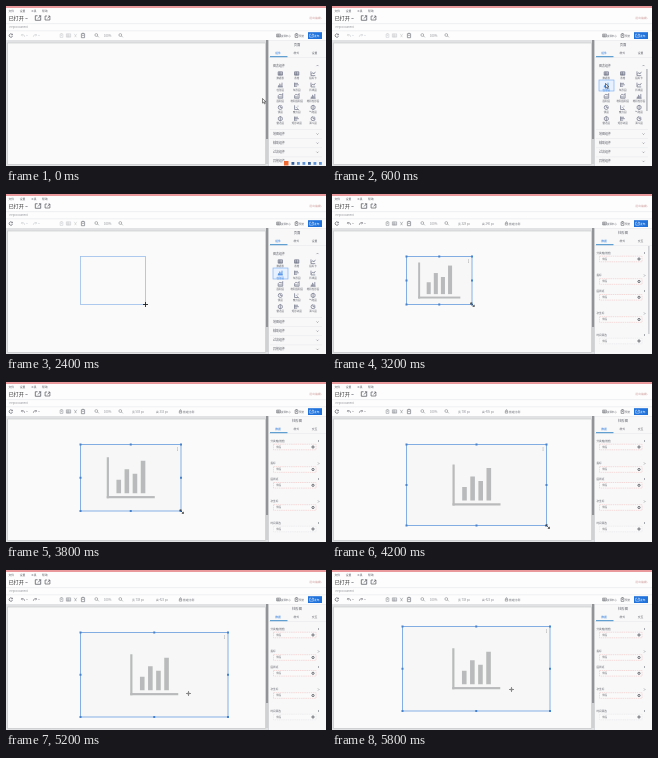
These frames come from a looping animation (320x160 px, 6.2 s). An HTML page with a canvas:

```html
<!DOCTYPE html>
<html lang="zh">
<head>
<meta charset="utf-8">
<style>
html, body { margin: 0; width: 100%; height: 100%; overflow: hidden; background: #fff; }
canvas { display: block; width: 320px; height: 160px; }
</style>
</head>
<body>
<canvas id="stage" width="320" height="160"></canvas>
<script>
const c = document.getElementById('stage').getContext('2d');
const LOOP = 6200, STEP = 200, LAST = 5800;
const BLUE = '#1f72dc', INK = '#5c5e66', GREY = '#85888e', RULE = '#e4e5e8', SHAPE = '#b9babb';
const LEFT = 74.5, TOP = 62.5;

// Each key: time, x, y
const pointer = [[0, 257, 94], [200, 264, 88], [400, 274, 79], [600, 274, 79], [800, 226, 70],
  [1000, 136, 58], [1200, 78, 53], [1400, 74, 62], [1600, 79, 66], [2000, 112, 90], [2400, 139, 110],
  [3400, 140, 110], [3600, 150, 116], [3800, 175, 129], [4000, 200, 138], [4200, 215, 144],
  [4600, 222, 147], [4800, 202, 135], [5000, 182, 123], [5200, 182, 123], [5800, 179, 119]];
const corner = [[2600, 140, 110.5], [3400, 140, 110.5], [3600, 150, 116], [3800, 175, 129],
  [4000, 200, 138], [4200, 214.5, 143.5], [4600, 222, 147]];
const shift = [[5200, 0, 0], [5800, -4, -6]];

function at(keys, t) {
  let i = keys.findIndex(k => k[0] > t);
  if (i < 0) return keys[keys.length - 1].slice(1);
  if (i === 0) return keys[0].slice(1);
  const a = keys[i - 1], b = keys[i], p = (t - a[0]) / (b[0] - a[0]);
  return [a[1] + (b[1] - a[1]) * p, a[2] + (b[2] - a[2]) * p];
}

function box(x, y, w, h, color) {
  c.fillStyle = color;
  c.fillRect(x, y, w, h);
}

function frame(x, y, w, h, color, width = 1) {
  c.strokeStyle = color;
  c.lineWidth = width;
  c.strokeRect(x, y, w, h);
}

function text(s, x, y, size = 3.4, color = INK, align = 'left') {
  c.font = `${size}px "Noto Sans CJK SC", "Noto Sans CJK", "Noto Sans", sans-serif`;
  c.textAlign = align;
  c.textBaseline = 'middle';
  c.fillStyle = color;
  c.fillText(s, x, y);
}

function icon(d, x, y, color = INK, width = .7, scale = 1, flip = 1) {
  c.save();
  c.translate(x, y);
  c.scale(scale * flip, scale);
  c.strokeStyle = color;
  c.lineWidth = width;
  c.stroke(new Path2D(d));
  c.restore();
}

const shapes = {
  table: 'M-2.5-2h5v4h-5zM-2.5-.5h5M-2.5 1h5M-.5-2v4',
  bars: 'M-2 2.5v-2M-.7 2.5v-4M.7 2.5v-3M2 2.5v-5M-3 2.5h6',
  rows: 'M-2.5-2.5v5M-2.5-1.7h4M-2.5 0h5M-2.5 1.7h3',
  line: 'M-2.5-2.5v5h5M-2 1l1.5-2L1 .5l1.7-2.5',
  area: 'M-2.5 2.5v-3l2-2 1.5 1.5 1.8-2v5.5zM-2 1h4',
  pie: 'M2.4 0A2.4 2.4 0 1 1 0-2.4V0zM1-2.3A2.4 2.4 0 0 1 2.3-1',
  dots: 'M-2.5-2.5v5h5M-1 0h1M1-1.5h1M.5 1h1',
  hex: 'M0-2.6l2.3 1.3v2.6L0 2.6l-2.3-1.3v-2.6zM0-2.6V2.6',
  open: 'M-.5-2.5h-2.5v5h6v-3M0 .5l3-3M1-2.5h2v2',
  turn: 'M1.6-1.2A2 2 0 1 0 2 .5M2-2v1.2H.7',
  undo: 'M2 1.5C2-1 0-1-2-.5M-.7-1.8L-2-.5l1.3 1',
  paste: 'M-1.6-1.8h3.2v4h-3.2zM-.8-2.2h1.6M-.7 0h1.4',
  cut: 'M-1.5-2L1 2M1.5-2L-1 2',
  lens: 'M1.2-.5a1.4 1.4 0 1 1-2.8 0 1.4 1.4 0 0 1 2.8 0M1 .5l1.3 1.3',
  lock: 'M-1.5-.3h3v2.3h-3zM-.9-.3v-1a.9.9 0 0 1 1.8 0v1',
  down: 'M-1-.5l1 1 1-1',
  next: 'M-.5-1l1 1-1 1'
};

const palette = [
  ['table', '数据表'], ['table', '表格'], ['line', '指标卡'],
  ['bars', '柱形图'], ['rows', '条形图'], ['line', '折线图'],
  ['area', '面积图'], ['area', '堆积面积图'], ['bars', '堆积柱形图'],
  ['pie', '饼图'], ['dots', '散点图'], ['hex', '气泡图'],
  ['hex', '雷达图'], ['rows', '矩形树图'], ['pie', '漏斗图']
];

function header() {
  box(0, 0, 320, 160, '#fdfdfd');
  box(0, 0, 320, 2, '#e9989b');
  ['文件', '设置', '工具', '帮助'].forEach((s, i) => text(s, 2.5 + i * 11.2, 4.8, 2.8));
  text('已打开', 2.5, 12.3, 5.1, '#333');
  icon(shapes.down, 20.5, 12.5);
  icon(shapes.open, 32, 12, INK, .9, .9);
  icon(shapes.open, 41.5, 12, INK, .9, .8);
  text('退出编辑 ›', 316, 12.3, 2.8, '#cf9c9c', 'right');
  box(0, 17.5, 320, .6, RULE);
  text('Help Document', 3.5, 21.4, 2.5, GREY);
  box(0, 24.6, 320, .6, RULE);
}

function toolbar(selected, w, h) {
  const tone = selected ? GREY : '#c4c6ca';
  icon(shapes.turn, 4.8, 29.5, INK, .8, .85);
  [[17, 1], [29, -1]].forEach(([x, flip]) => {
    icon(shapes.undo, x, 29.5, selected ? INK : tone, .8, .8, flip);
    icon(shapes.down, x + 4, 29.5, tone, .6, .8);
  });
  ['paste', 'table', 'cut'].forEach((s, i) => icon(shapes[s], 55.5 + i * 7, 29.5, tone, .6, .85));
  icon(shapes.paste, 77, 29.5, GREY, .8);
  icon(shapes.lens, 90.5, 29.5, GREY, .6);
  text('100%', 98, 29.6, 2.8, GREY);
  icon(shapes.lens, 114.5, 29.5, GREY, .6);
  if (selected) {
    text('宽 ' + Math.round(w * 5) + ' px', 126, 29.6, 2.8, GREY);
    text('高 ' + Math.round(h * 5) + ' px', 150, 29.6, 2.8, GREY);
    icon(shapes.lock, 174.5, 29.5, INK, .6, .8);
    text('锁定比例', 177, 29.6, 2.8);
  }
  icon(shapes.table, 272.5, 29.5, INK, .6, .75);
  text('资源中心', 275, 29.6, 2.4);
  icon(shapes.paste, 290.5, 29.5, INK, .7, .85);
  text('预览', 293, 29.6, 2.6);
  box(302, 26.2, 14, 6.8, BLUE);
  icon(shapes.open, 305.5, 29.7, '#fff', .8, .6);
  text('发布', 308, 29.7, 2.7, '#fff');
}

function workspace() {
  box(0, 34, 263, 126, '#e1e2e4');
  box(2, 37, 257.5, 121, '#fafafa');
  frame(1.5, 37, 258, 121.5, '#c9cacc', .7);
  box(260, 34, 2.3, 124, '#d0d1d3');
  box(260, 34, 2.3, 99, '#929396');
  box(262.3, 34, .7, 126, '#d2d3d6');
}

function tabs(title, names) {
  box(263, 34, 57, 126, '#f8f8f9');
  box(263, 34, 57, .5, RULE);
  text(title, 291, 38.5, 3.3, INK, 'center');
  names.forEach((s, i) => text(s, 272 + i * 18.3, 47.2, 2.8, i ? INK : BLUE, 'center'));
  box(263, 51, 57, .5, RULE);
  box(264, 50.2, 17.5, 1, '#3d8ac8');
}

function palettePanel(t) {
  tabs('页面', ['组件', '样式', '设置']);
  text('图表组件', 267, 59.6, 3);
  icon(shapes.down, 311.5, 59.6, GREY, .7, -1);
  palette.forEach(([shape, label], i) => {
    const x = 274.3 + i % 3 * 16.4, y = 67.5 + Math.floor(i / 3) * 11.3;
    const active = i === 3 && t >= 400;
    if (active) {
      box(267, 74, 15, 11, '#e7f1ff');
      frame(267, 74, 15, 11, '#71a8f2', .6);
    }
    icon(shapes[shape], x, y, active ? BLUE : '#686c80', .8, .85);
    text(label, x, y + 4.8, 2.5, active ? BLUE : INK, 'center');
  });
  if (t >= 400 && t < 1600) box(314, 63, 1.8, 42, '#c3c4c7');
  ['地图组件', '辅助组件', '过滤组件', '其他组件'].forEach((s, i) => {
    const y = 128 + i * 9.1;
    box(264, y - 4.6, 52, .5, RULE);
    text(s, 267, y, 3);
    icon(shapes.down, 311.5, y, GREY);
  });
  if (t < 600) {
    box(277, 154.5, 42, 5.5, '#f5f6f8');
    box(278, 155, 4.5, 4.5, '#ef6a32');
    for (let i = 0; i < 6; i++) box(285.5 + i * 5.5, 156, 2.8, 2.8, i % 3 ? '#5b92d8' : '#365f9c');
  }
}

function fieldPanel(t) {
  tabs('柱形图', ['数据', '样式', '交互']);
  [['分类轴(维度)', 59, 65], ['指标', 81.5, 87.5], ['图例项', 97, 103.3],
    ['次坐标', 119.5, 125.5], ['时间筛选', 141, 147]].forEach(([label, y, fieldY], i) => {
    text(label, 264.5, y, 2.6);
    icon(shapes.next, 312.5, y, GREY);
    box(267.5, fieldY - 2.8, 42.5, 5.6, '#fafafa');
    c.setLineDash([1.5, .7]);
    frame(267.5, fieldY - 2.8, 42.5, 5.6, i === 4 ? '#e2e3e5' : '#efb8b8', .5);
    c.setLineDash([]);
    text('字段', 270, fieldY, 2.6);
    icon('M1.1 0a1.1 1.1 0 1 1-2.2 0 1.1 1.1 0 0 1 2.2 0', 307, fieldY, INK, .9);
  });
  if (t < 3600) box(316, 52, 1.6, 88, '#d0d1d4');
}

function chart(x, y, w, h) {
  box(x, y, w, h, '#f7f7f7');
  c.save();
  c.translate(x + w / 2, y + h / 2);
  const s = Math.min(1, h * .0183);
  c.scale(s, s);
  box(-24, -20.5, 2.2, 41, SHAPE);
  box(-24, 18.3, 48, 2.2, SHAPE);
  [13.5, 24, 19.5, 32.5].forEach((size, i) => box(-14.3 + i * 8.1, 15.5 - size, 4.6, size, SHAPE));
  c.restore();
  frame(x, y, w, h, '#76a6e2', .9);
  for (let i = 0; i < 9; i++) {
    if (i !== 4) box(x + w * (i % 3) / 2 - 1, y + h * Math.floor(i / 3) / 2 - 1, 2, 2, '#4682cc');
  }
  for (let i = 0; i < 3; i++) box(x + w - 3.8, y + 3 + i * 1.2, .7, .7, '#888');
}

function cursor(t, x, y) {
  if (t < 800) {
    c.fillStyle = '#fff';
    c.strokeStyle = '#333';
    c.lineWidth = .6;
    const arrow = new Path2D(`M${x - 1} ${y - 2}v4.6l1.1-1 .8 1.8.8-.4-.8-1.7h1.5z`);
    c.fill(arrow);
    c.stroke(arrow);
  } else if (t < 2600) {
    icon('M-2.5 0h5M0-2.5v5', x, y, '#222', .9);
  } else if (t < 4800) {
    icon('M-1.5-1.5l3.3 3.3M-1.7 0v-1.7H0M2 .3V2H.3', x, y, '#333', .7);
  } else {
    icon('M-2.5 0h5M0-2.5v5M-1.3 0L0-1.3 1.3 0 0 1.3z', x, y, '#858585', .9);
  }
}

function draw(now) {
  const t = Math.min(LAST, Math.floor(now % LOOP / STEP) * STEP);
  const selected = t >= 2600;
  const [px, py] = at(pointer, t), [right, bottom] = at(corner, t), [dx, dy] = at(shift, t);
  const w = right - LEFT, h = bottom - TOP;
  header();
  toolbar(selected, w, h);
  workspace();
  if (selected) {
    fieldPanel(t);
    chart(LEFT + dx, TOP + dy, w, h);
  } else {
    palettePanel(t);
    if (t >= 1600) frame(LEFT, TOP, px + .5 - LEFT, py + .5 - TOP, '#9bbfec', .8);
  }
  cursor(t, px + .5, py + .5);
  requestAnimationFrame(draw);
}

requestAnimationFrame(draw);
</script>
</body>
</html>
```
